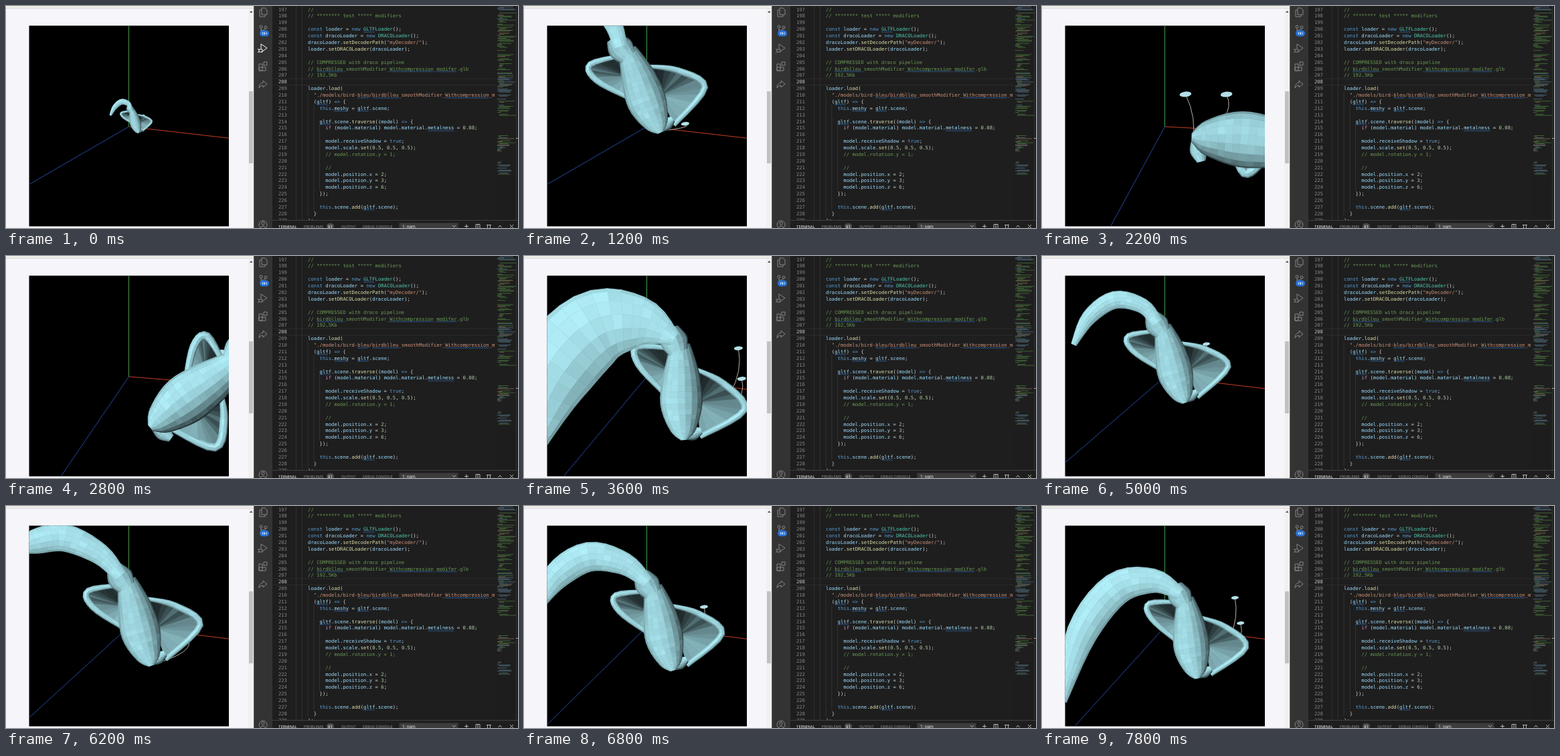
Animation of 765 by 333 pixels, one loop 8 s. Source, as an HTML page with a canvas:

```html
<!DOCTYPE html>
<html lang="en">
<head>
<meta charset="utf-8">
<title>Bird model viewer</title>
<style>
  html, body { margin: 0; width: 100%; height: 100%; overflow: hidden; background: #f6f5fa; }
  svg, canvas { position: absolute; display: block; }
  svg { left: 0; top: 0; }
  canvas { left: 34px; top: 29px; }
  text { white-space: pre; text-rendering: geometricPrecision; }
  .code text { font: 7.26px "DejaVu Sans Mono", monospace; fill: #d4d4d4; }
  .panel text { font: 5.7px Roboto, sans-serif; fill: #8b8b8b; }
  .icons { fill: none; stroke: #858585; }
</style>
</head>
<body>
<svg id="page" width="765" height="333" viewBox="0 0 765 333">
  <rect width="370" height="3" fill="#f0eee9"/>
  <path d="M0 3.5H370" stroke="#dcdad8"/>
  <rect x="362" y="4" width="8" height="329" fill="#f1f1f1"/>
  <path d="M364 10l2.3-3 2.3 3z" fill="#555"/>
  <rect x="363" y="128" width="6" height="108" fill="#c1c1c1"/>
  <rect x="370.5" width="395" height="333" fill="#1e1e1e"/>
  <rect x="370.5" width="27.5" height="333" fill="#333"/>
  <g class="icons">
    <path d="M382 3h5l3 3v7h-8zM382 6h-3v10h8v-3"/>
    <path d="M381 33v7M381 36q6 1 7-3"/>
    <circle cx="381" cy="31" r="2"/><circle cx="388" cy="32" r="2"/>
    <path id="run" d="M381 64v-7l9 6-8 6M378 65h5v4h-5zM376 64l2 2M376 70l2-2"/>
    <path d="M378 87h5v10h-5zM378 92h10v5h-10zM385 84h5v5h-5z"/>
    <path d="M384 112l6 5-6 5v-3q-4 0-6 4 0-7 6-8z"/>
    <circle cx="384" cy="328" r="6"/><circle cx="384" cy="326" r="2.2"/><path d="M380 333q4-6 8 0"/>
  </g>
  <rect x="379" y="36.5" width="14" height="9" rx="4.5" fill="#2672d8"/>
  <text x="386" y="43" text-anchor="middle" fill="#fff" style="font:bold 5px Roboto,sans-serif">191</text>
  <g class="code" id="code"></g>
  <g id="minimap" opacity=".65"></g>
  <path d="M762.5 0V321" stroke="#333"/>
  <rect x="762" y="198" width="3" height="1" fill="#aaa"/>
  <g class="panel">
    <rect x="398" y="321.5" width="367" height="12" fill="#1e1e1e"/>
    <path d="M398 321.5H765" stroke="#414141"/>
    <text x="407" y="333" style="fill:#e7e7e7">TERMINAL</text>
    <text x="445" y="333">PROBLEMS</text>
    <rect x="479" y="326" width="11" height="9" rx="4.5" fill="#4d4d4d"/>
    <text x="484.5" y="333" text-anchor="middle" style="fill:#fff">61</text>
    <text x="501" y="333">OUTPUT</text>
    <text x="533" y="333">DEBUG CONSOLE</text>
    <rect x="587.5" y="325.5" width="88" height="10" fill="#3c3c3c"/>
    <text x="592" y="333" style="font-size:6.5px;fill:#f0f0f0">1: npm</text>
    <path d="M667 329l2.5 2.5 2.5-2.5M685 330.5h6M688 327.5v6M702 327.5h6v7h-6zM705 327v7M718 328.5h7M719.5 328.5v5h4v-5M735.5 332l2.5-3 2.5 3M753 328l5 5M758 328l-5 5" fill="none" stroke="#c5c5c5" stroke-width=".9"/>
  </g>
</svg>
<canvas id="scene" width="300" height="303"></canvas>
<script>
const $ = id => document.getElementById(id);
const hash = n => { const v = Math.sin(n * 127.1 + 11.7) * 43758.5; return v - Math.floor(v); };

// ---- Editor ----
const SOURCE = `    //
    // ******** test ***** modifiers

    const loader = new GLTFLoader();
    const dracoLoader = new DRACOLoader();
    dracoLoader.setDecoderPath("myDecoder/");
    loader.setDRACOLoader(dracoLoader);

    // COMPRESSED with draco pipeline
    // birdblleu_smoothModifier_Withcompression_modifer.glb
    // 192,5Kb

    loader.load(
      "./models/bird-bleu/birdblleu_smoothModifier_Withcompression_m
      (gltf) => {
        this.meshy = gltf.scene;

        gltf.scene.traverse((model) => {
          if (model.material) model.material.metalness = 0.08;

          model.receiveShadow = true;
          model.scale.set(0.5, 0.5, 0.5);
          // model.rotation.y = 1;

          //
          model.position.x = 2;
          model.position.y = 3;
          model.position.z = 6;
        });

        this.scene.add(gltf.scene);
      }
    );`.split('\n');
const TOKEN = /(\/\/.*)|("[^"]*"?)|\b(const|new|this|true)\b|(=>)|\b(if)\b|([A-Z]+Loader)|(\w+(?=\())|([a-zA-Z]\w*)|(\d[\d.]*)/g;
const TOKEN_COLORS = ['#6a9955', '#ce9178', '#569cd6', '#569cd6', '#c586c0', '#4ec9b0', '#dcdcaa', '#9cdcfe', '#b5cea8'];
const UNKNOWN_WORD = /GLTF(?=Loader)|birdblleu|\bbleu\b|Withcompression|modifer\b|gltf|meshy|metalness/g;
const CHAR = 4.37, LINE = 9.88, LEFT = 433.6, FIRST = 197, ACTIVE = 208;

const highlight = code => code.replace(TOKEN, (token, ...groups) => {
  const color = TOKEN_COLORS[groups.findIndex(Boolean)];
  return `<tspan fill="${color}">${token.replace('>', '&gt;')}</tspan>`;
});

function squiggle(x, y, width) {
  let d = `M${x} ${y}`;
  for (let i = 1; i * 1.5 <= width; i++) d += `L${x + i * 1.5} ${y - (i % 2) * 1.2}`;
  return `<path d="${d}" fill="none" stroke="#3794ff" stroke-width=".55"/>`;
}

function guide(col, from, to) {
  const x = LEFT + col * CHAR, y = n => (n - FIRST) * LINE;
  return `<path d="M${x} ${y(from)}V${y(to + 1)}" stroke="#404040" stroke-width=".6"/>`;
}

let editor = '<path d="M398 109H731M398 118.5H731" stroke="#2b2b2b"/>' +
  guide(0, 197, 229) + guide(2, 197, 229) + guide(4, 210, 228) + guide(6, 212, 227) + guide(8, 215, 224);
SOURCE.forEach((line, i) => {
  const y = 7.6 + i * LINE, indent = line.search(/\S|$/), number = FIRST + i;
  editor += `<text x="420" y="${y}" text-anchor="end" style="fill:${number === ACTIVE ? '#c6c6c6' : '#858585'}">${number}</text>`;
  editor += `<text x="${LEFT + indent * CHAR}" y="${y}">${highlight(line.trim())}</text>`;
  for (const word of line.matchAll(UNKNOWN_WORD))
    editor += squiggle(LEFT + word.index * CHAR, y + 2.4, word[0].length * CHAR);
});
$('code').innerHTML = editor;

let minimap = '<rect x="731" width="34" height="321" fill="#1e1e1e"/>';
for (let y = 1; y < 252; y += 1.52) {
  const inGap = (y > 165 && y < 193) || (y > 218 && y < 233);
  if (inGap || hash(y + 300) < .2) continue;
  const greenShare = y < 10 ? 0 : y < 100 ? .75 : .4, pick = hash(y);
  const color = pick < greenShare ? '#5f9e4c' : pick < .85 ? '#6f9db8' : '#c09a6c';
  const x = 734 + Math.floor(hash(y + 50) * 3) * 1.5;
  minimap += `<rect x="${x}" y="${y}" width="${4 + hash(y + 90) * 22}" height=".8" fill="${color}"/>`;
}
$('minimap').innerHTML = minimap;

// ---- Bird: tapered tubes through [x, y, radius], relative to the middle of the body ----
const TAIL = [[-146, -27, 4], [-123, -68, 11], [-85, -94, 13], [-43, -85, 11], [-22, -60, 9]];
const RUFF = [[-30, -72, 10], [-22, -58, 17], [-13, -45, 12]];
const BODY = [[-13, -55, 12], [-3, -20, 22], [6, 17, 26], [16, 48, 16], [20, 60, 4]];
const HEAD = [[20, 56, 4], [29, 50, 8], [38, 44, 4]];
const LEFT_WING = [[-16, -48, 2], [-64, -40, 4], [-58, -18, 4], [-17, 10, 3]];
const RIGHT_WING = [[11, -30, 2], [52, -20, 4], [85, 6, 4], [39, 52, 3]];
const DISCS = [[65, 8, 5.5], [52, -28, 5.5]];
const HEAD_TOP = [24, 58, 0];

// The lean moves the near tail across the screen; azimuth and elevation are the camera's, in degrees.
const POSES = [
  { time: 0, x: 192, y: 172, scale: .3, turn: 0, leanX: 8, leanY: 0, tailWidth: 1, azimuth: 24, elevation: 15 },
  { time: 1200, x: 175, y: 125, scale: 1.12, turn: -.1, leanX: 30, leanY: -200, tailWidth: 1.2, azimuth: 24, elevation: 15 },
  { time: 2200, x: 325, y: 200, scale: 1.6, turn: 1.92, leanX: 252, leanY: 644, tailWidth: 1.5, azimuth: 9.5, elevation: 18 },
  { time: 3600, x: 233, y: 200, scale: 1.2, turn: .24, leanX: -75, leanY: 175, tailWidth: 4.8, azimuth: 18, elevation: 23 },
  { time: 5000, x: 193.5, y: 160, scale: 1, turn: 0, leanX: 0, leanY: 0, tailWidth: 1, azimuth: 20.4, elevation: 18.8 },
  { time: 6200, x: 195, y: 172, scale: 1.12, turn: 0, leanX: -15, leanY: -75, tailWidth: 1.55, azimuth: 20, elevation: 19.5 },
  { time: 7800, x: 220, y: 195, scale: 1.02, turn: .13, leanX: -48, leanY: 144, tailWidth: 2.2, azimuth: 18.5, elevation: 21.8 },
];
const DURATION = 8000, STEP = 200;
const CENTER = [183.5, 181];
const ctx = $('scene').getContext('2d');

function poseAt(time) {
  const i = POSES.findLastIndex(pose => pose.time <= time);
  const from = POSES[i], to = POSES[i + 1] || from;
  const k = (time - from.time) / (to.time - from.time || 1);
  const pose = {};
  for (const key in from) pose[key] = from[key] + (to[key] - from[key]) * (to === from ? 0 : k);
  return pose;
}

function place(pose, [x, y, r], shiftX = 0, shiftY = 0) {
  const c = pose.scale * Math.cos(pose.turn), s = pose.scale * Math.sin(pose.turn);
  return [
    pose.x + c * x - s * y + shiftX * pose.leanX,
    pose.y + s * x + c * y + shiftY * pose.leanY,
    r * pose.scale];
}

function placeTail(pose) {
  return TAIL.map((point, i) => {
    const u = 1 - i / (TAIL.length - 1);
    const [x, y, r] = place(pose, point, u * (2 - u), u * u);
    return [x, y, r * (1 + (pose.tailWidth - 1) * Math.sqrt(u))];
  });
}

function spline(points, perSpan = 5) {
  const last = points.length - 1, samples = [];
  const point = i => points[Math.max(0, Math.min(last, i))];
  for (let n = 0; n <= last * perSpan; n++) {
    const i = Math.min(last - 1, Math.floor(n / perSpan)), u = n / perSpan - i;
    const [a, b, c, d] = [-1, 0, 1, 2].map(offset => point(i + offset));
    samples.push(b.map((v, k) => v + .5 * u * (c[k] - a[k] +
      u * (2 * a[k] - 5 * v + 4 * c[k] - d[k] + u * (3 * (v - c[k]) + d[k] - a[k])))));
  }
  return samples;
}

function facet(points, shade) {
  ctx.beginPath();
  points.forEach(([x, y]) => ctx.lineTo(x, y));
  ctx.closePath();
  const level = Math.max(.08, Math.min(1, shade));
  ctx.fillStyle = ctx.strokeStyle = `rgb(${[176, 238, 248].map(c => Math.round(c * level))})`;
  ctx.lineWidth = .7;
  ctx.fill();
  ctx.stroke();
}

function tube(points, seed, ambient = .46, strips = 7) {
  const path = spline(points);
  const normals = path.map((_, i) => {
    const a = path[Math.max(0, i - 1)], b = path[Math.min(path.length - 1, i + 1)];
    const dx = b[0] - a[0], dy = b[1] - a[1], length = Math.hypot(dx, dy) || 1;
    return [-dy / length, dx / length];
  });
  const angle = j => (j / strips - .5) * Math.PI;
  const vertex = (i, j) => [0, 1].map(k => path[i][k] + normals[i][k] * path[i][2] * Math.sin(angle(j)));
  for (let i = 0; i < path.length - 1; i++) for (let j = 0; j < strips; j++) {
    const side = Math.sin(angle(j + .5)), [nx, ny] = normals[i];
    const light = -.45 * nx * side - .35 * ny * side + .8 * Math.cos(angle(j + .5));
    const shade = ambient + (1 - ambient) * light + (hash(seed + i * 9 + j) - .5) * .06;
    facet([vertex(i, j), vertex(i + 1, j), vertex(i + 1, j + 1), vertex(i, j + 1)], shade);
  }
}

// A fan of facets, dark near the shoulder and light near the body's end, with a bright rim.
function wing(pose, outline, seed) {
  const fold = Math.max(.4, Math.cos(pose.turn * .6));
  const points = outline.map(([x, y, r]) => place(pose, [x * fold, y * fold, r]));
  const rim = spline(points), first = points[0], last = points.at(-1);
  const root = [(first[0] + last[0]) / 2, (first[1] + last[1]) / 2];
  for (let i = 0; i < rim.length - 1; i++)
    facet([root, rim[i], rim[i + 1]], .1 + .6 * i / rim.length + hash(seed + i) * .2);
  tube(points, seed, .55, 4);
}

function antennae(pose) {
  const [endX, endY] = place(pose, HEAD_TOP);
  DISCS.forEach(disc => {
    const [x, y, r] = place(pose, disc, -.25, -.25);
    ctx.strokeStyle = '#c9c4bd';
    ctx.lineWidth = .9;
    ctx.beginPath();
    ctx.moveTo(x, y);
    ctx.quadraticCurveTo(x + r * 2, y + (endY - y) * .5, endX, endY);
    ctx.stroke();
    ctx.fillStyle = '#b4dfe8';
    ctx.beginPath();
    ctx.ellipse(x, y, r, r * .45, -.1, 0, Math.PI * 2);
    ctx.fill();
  });
}

function axis(dx, dy, color) {
  ctx.beginPath();
  ctx.moveTo(...CENTER);
  ctx.lineTo(CENTER[0] + dx * 200, CENTER[1] + dy * 200);
  ctx.strokeStyle = color;
  ctx.lineWidth = 1;
  ctx.stroke();
}

function draw(time) {
  const pose = poseAt(time);
  const radians = Math.PI / 180;
  const rise = Math.sin(pose.elevation * radians), spread = Math.tan(pose.azimuth * radians);
  const part = points => points.map(point => place(pose, point));

  ctx.setTransform(1, 0, 0, 1, -34, -29);
  ctx.clearRect(34, 29, 300, 303);
  ctx.save();
  ctx.beginPath();
  ctx.rect(34.5, 29.5, 298.5, 301);
  ctx.clip();
  ctx.fillStyle = '#000';
  ctx.fillRect(34, 29, 300, 303);
  axis(0, -1, '#43a047');
  axis(1, rise * spread, '#c43c22');
  axis(-1, rise / spread, '#24479c');
  antennae(pose);
  wing(pose, LEFT_WING, 1);
  wing(pose, RIGHT_WING, 2);
  tube(part(HEAD), 3);
  tube(part(BODY), 4, .42, 9);
  tube(part(RUFF), 5, .4);
  tube(placeTail(pose), 6, .75);
  ctx.restore();
  $('run').setAttribute('stroke', time < STEP ? '#fff' : '#858585');
}

function tick() {
  draw(Math.floor(performance.now() % DURATION / STEP) * STEP);
  requestAnimationFrame(tick);
}
tick();
</script>
</body>
</html>
```
